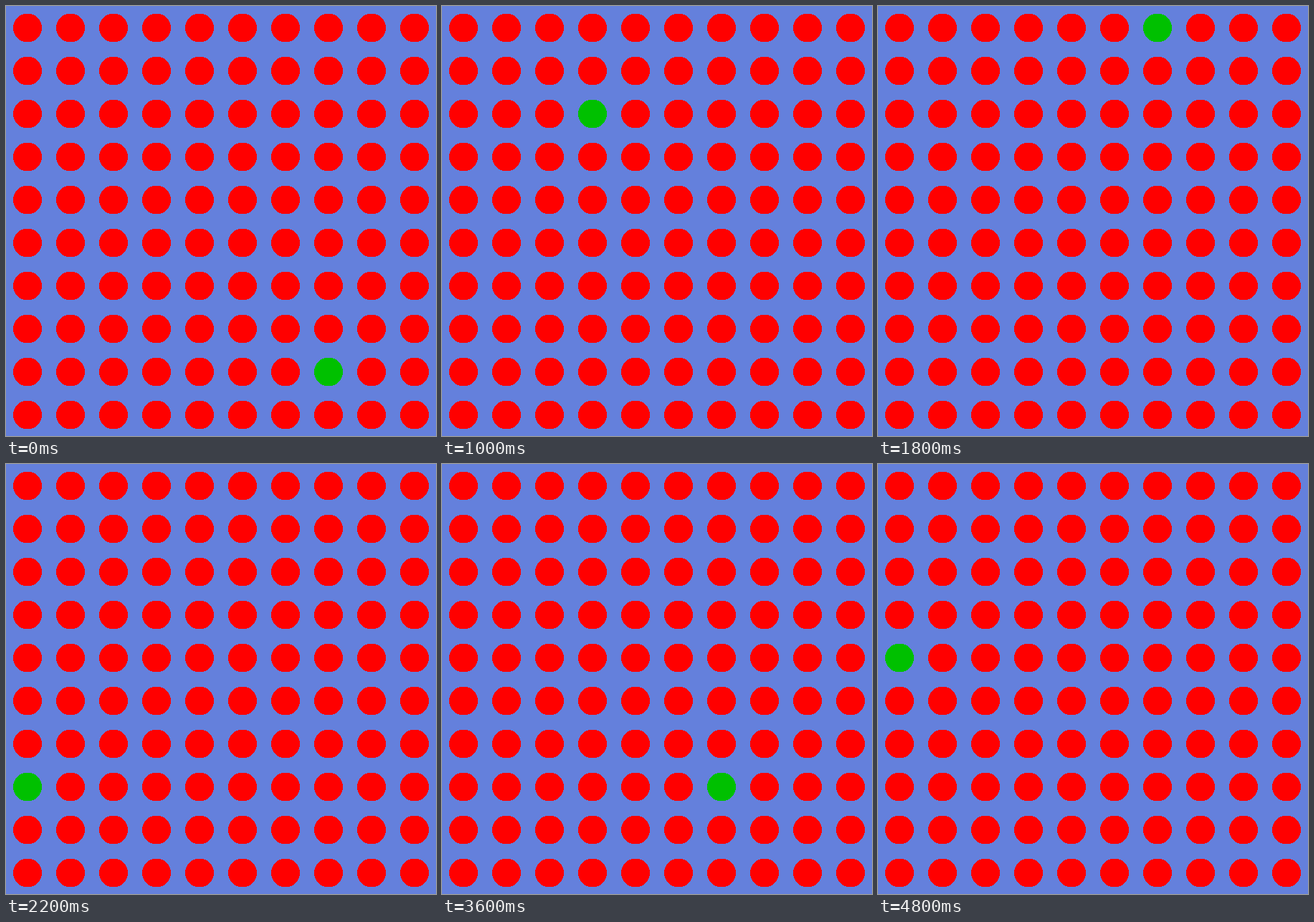
Animation of 600 by 600 pixels, one loop 5000 ms. Source, as an HTML page with a canvas:

```html
<!DOCTYPE html>
<html lang="en">
<head>
<meta charset="utf-8">
<title>Wandering dot</title>
<style>
  html, body { margin: 0; width: 100%; height: 100%; overflow: hidden; }
  canvas { display: block; }
</style>
</head>
<body>
<canvas width="600" height="600"></canvas>
<script>
const ctx = document.querySelector('canvas').getContext('2d');
const STEP = 200, CELL = 60, RADIUS = 20;

// Column and row of the green dot at each step; 07 rests for two steps.
const path = ('78 19 61 27 42 32 99 76 48 60 43 07 07 ' +
              '54 56 57 94 29 67 54 34 30 42 46 04').split(' ');

// Hard-edged disc built from pixel rows.
function dot(col, row, color) {
  const x = col * CELL + CELL / 2, y = row * CELL + CELL / 2;
  ctx.fillStyle = color;
  for (let k = 1 - RADIUS; k < RADIUS; k++) {
    const half = Math.round(Math.sqrt(RADIUS * RADIUS - k * k));
    ctx.fillRect(x - half, y + k, 2 * half, 1);
  }
}

function draw(time) {
  const active = path[Math.floor(time / STEP) % path.length];
  ctx.fillStyle = '#6480dc';
  ctx.fillRect(0, 0, 600, 600);
  for (let row = 0; row < 10; row++)
    for (let col = 0; col < 10; col++)
      dot(col, row, active === `${col}${row}` ? '#00c000' : '#f00');
}

const start = performance.now();
function tick() {
  draw(performance.now() - start);
  requestAnimationFrame(tick);
}
tick();
</script>
</body>
</html>
```
